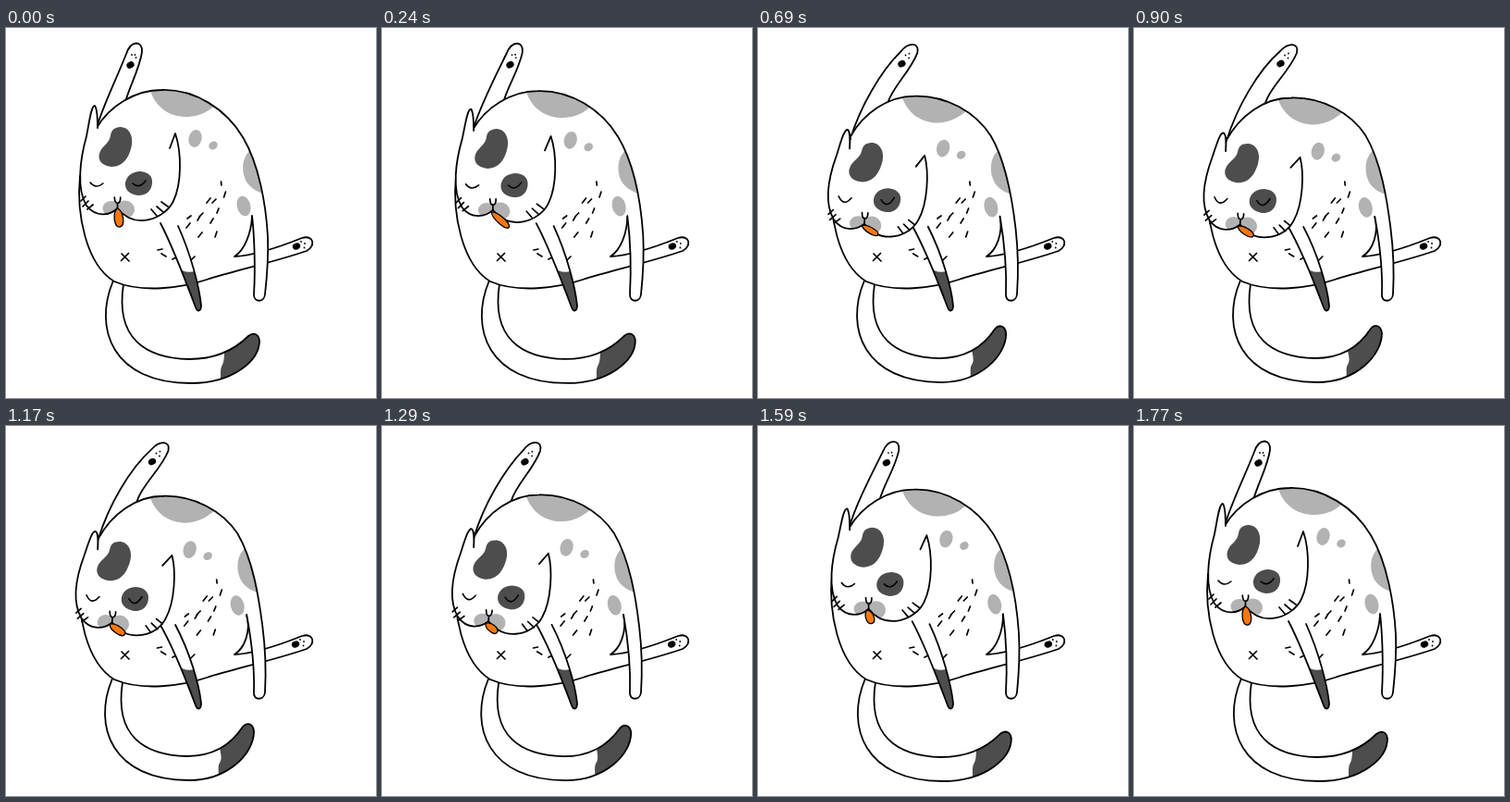
Write an HTML page with a canvas that moves like this. It is 400 px wide and 400 px high and loops after 1800 ms.

```html
<!DOCTYPE html>
<html lang="en">
<head>
<meta charset="utf-8">
<title>Cat washing itself</title>
<style>
html, body { margin: 0; width: 100%; height: 100%; overflow: hidden; background: #fff; }
canvas { display: block; width: 400px; height: 400px; }
</style>
</head>
<body>
<canvas id="stage" width="400" height="400"></canvas>
<script>
const ctx = document.getElementById('stage').getContext('2d');
const LOOP = 1800, DARK = '#4d4d4d', GRAY = '#b2b2b2', ORANGE = '#f9780c';

const soft = x => (1 - Math.cos(Math.PI * Math.min(1, Math.max(0, x)))) / 2;
// Eases up between a and b, holds, eases down between c and d.
const sway = (t, a, b, c, d) => soft((t - a) / (b - a)) - soft((t - c) / (d - c));
const lerp = (a, b, p) => a + (b - a) * p;

// Blends two path strings with the same commands.
function mix(from, to, p) {
  const ends = to.match(/-?[\d.]+/g);
  let i = 0;
  return new Path2D(from.replace(/-?[\d.]+/g, n => lerp(+n, +ends[i++], p).toFixed(3)));
}

function fill(path, color) {
  ctx.fillStyle = color;
  ctx.fill(path);
}

function line(path, width = 1.8) {
  ctx.lineWidth = width;
  ctx.stroke(path);
}

function shape(path, color = '#fff', width) {
  fill(path, color);
  line(path, width);
}

function oval(x, y, rx, ry, color, turn = 0) {
  ctx.beginPath();
  ctx.ellipse(x, y, rx, ry, turn, 0, 7);
  ctx.fillStyle = color;
  ctx.fill();
}

function clipped(path, draw) {
  ctx.save();
  ctx.clip(path);
  draw();
  ctx.restore();
}

function paw(x, y, dots, turn) {
  oval(x, y, 4.3, 3.5, '#000', turn);
  for (const [dx, dy] of dots) oval(x + dx, y + dy, 0.9, 0.9, '#000');
}

function tail(p) {
  const path = mix(
    'M116,273 C94,325 115,384 200,384 C245,384 274,360 274,338 C273,330 267,329 262,333 C248,347 228,358 198,358 C150,357 118,335 127,277',
    'M115,273 C93,325 115,383 198,383 C240,383 268,354 268,330 C267,321 260,320 256,325 C245,342 226,357 196,357 C149,356 117,335 126,277', p);
  fill(path, '#fff');
  clipped(path, () => fill(mix(
    'M237,345 C235,354 237,359 233,366 C231,371 233,376 231,386 L290,386 L290,320 L250,320 Z',
    'M231,342 C230,352 235,357 231,364 C228,369 231,374 229,386 L290,386 L290,310 L243,310 Z', p), DARK));
  line(path);
}

function raisedLeg(p) {
  shape(mix(
    'M98,108 C104,86 119,56 130,28 C135,13 148,13 147,26 C144,45 134,62 129,80',
    'M100,122 C111,86 134,46 158,25 C167,15 179,16 176,27 C168,47 147,64 142,81', p));
  paw(lerp(134.5, 158.5, p), lerp(40, 38.5, p),
    [[lerp(1.5, 4.5, p), lerp(-11, -9, p)], [lerp(5, 8.5, p), -11], [lerp(6, 8, p), lerp(-8, -6, p)]], -0.5);
}

const TUFTS = [
  [232.5, 166, 0.4, 4], [237.5, 177, -2, 6], [221, 184, -4, 5], [227, 185, -4, 4],
  [213, 200, -4, 4], [230, 195, -2, 5], [210, 203, -3, 5], [224, 206, -3, 5],
  [200, 203, -4, 3], [199, 211, -4, 5], [228, 220, -2, 6], [212, 221, -4, 5],
  [164, 240, 5, -1], [168, 244, 5, 3], [204, 247, -4, 4], [180, 250, 6, -3]
];

function body(p) {
  shape(new Path2D('M80,160 C76,200 86,255 117,274 C147,287 190,281 217,272 C245,263 290,253 325,241 C335,236 333,223 320,227 C300,235 270,246 247,247 C258,240 265,222 266,203'
    .replace('266,203', lerp(266, 260, p) + ',204')));
  const back = mix(
    'M98,108 C112,84 140,67 168,67 C205,66 238,88 256,118 C274,148 281,192 283,225 C284,250 282,270 280,288 C279,297 268,297 268,288 C270,255 268,220 266,203',
    'M100,122 C114,96 140,76 170,76 C203,75 234,92 250,116 C267,145 273,185 277,215 C281,245 281,270 280,288 C279,297 267,297 268,288 C269,255 263,220 260,204', p);
  fill(back, '#fff');
  clipped(back, () => {
    fill(mix(
      'M155,64 C160,86 178,97 197,96 C210,95 218,91 225,84 L225,55 Z',
      'M154,72 C160,95 176,105 195,105 C208,104 217,99 225,92 L225,62 Z', p), GRAY);
    fill(mix(
      'M268,130 C254,136 253,158 262,169 C267,175 274,178 284,181 L295,140 Z',
      'M262,130 C247,137 248,160 256,170 C261,176 268,179 278,182 L289,140 Z', p), GRAY);
  });
  line(back);

  oval(lerp(204.5, 198.5, p), lerp(119.5, 134, p), 7, 9.5, GRAY, 0.25);
  oval(lerp(224, 218, p), lerp(127, 141, p), 5, 4.2, GRAY, -0.6);
  oval(lerp(257, 250, p), lerp(192.5, 194, p), 7.3, 11, GRAY, -0.25);
  paw(lerp(314, 313, p), 236, [[5, -5], [9, -3], [8.5, 1.5]], -0.4);

  const marks = new Path2D('M125,244 L133,252 M132.5,243.5 L124.5,251.5');
  for (const [x, y, dx, dy] of TUFTS) {
    const sx = x - 5 * p * Math.max(0, 250 - y) / 85;
    marks.moveTo(sx, y);
    marks.lineTo(sx + dx, y + dy);
  }
  line(marks, 1.7);
}

function arm(p) {
  const path = mix(
    'M167,211 C178,232 193,270 205,302 C207,308 211,306 211,300 C209,280 200,245 186,214',
    'M165,212 C177,232 193,270 205,302 C207,308 211,306 211,300 C209,280 199,245 183,215', p);
  fill(path, '#fff');
  clipped(path, () => fill(new Path2D('M184,258 Q193,266 204,263 L220,310 L195,310 Z'), DARK));
  line(path);
}

// time, base x, base y, tip x, tip y, width
const LICKS = [
  [0, 120.5, 195, 123, 215, 6.3],
  [240, 119, 197, 138, 213.5, 5],
  [480, 118, 197, 134, 207, 3.6],
  [690, 118, 197, 136, 206, 4.3],
  [1170, 118, 197, 135, 207, 5.3],
  [1410, 117, 198, 126, 206, 5.3],
  [1770, 120.5, 195, 123, 215, 6.3],
  [1800, 120.5, 195, 123, 215, 6.3]
];

function tongue(t) {
  const i = LICKS.findIndex(k => k[0] > t), from = LICKS[i - 1], to = LICKS[i];
  const p = (t - from[0]) / (to[0] - from[0]);
  const [, x, y, tx, ty, w] = from.map((v, j) => lerp(v, to[j], p));
  const len = Math.hypot(tx - x, ty - y);
  ctx.save();
  ctx.translate(x, y);
  ctx.rotate(Math.atan2(ty - y, tx - x));
  shape(new Path2D(`M0,0 C${len * 0.2},${-w} ${len},${-w} ${len},0 C${len},${w} ${len * 0.2},${w} 0,0 Z`), ORANGE, 1.3);
  ctx.restore();
}

function head(p, ears, t) {
  ctx.save();
  ctx.translate(120 - 5.5 * p, 190 + 17.5 * p);
  ctx.rotate(0.063 * p);
  ctx.translate(-120, -190);

  const face = mix(
    'M177,130 L183,114 C190,135 190,168 181,187 C172,206 140,219 120.5,195 C113,202 98,206 87,192 C76,174 80,142 87,117 C90,102 92,84 96,84 C99,88 99,98 99,108',
    'M171,130 L180.6,118.5 C186,135 187,168 178,187 C170,206 140,217 120.5,195 C113,202 98,206 87,192 C75,174 79,147 86,124 C90,109 93,96 97,98 C100,101 100,108 100,117', ears);
  fill(face, '#fff');
  clipped(face, () => {
    oval(114, 195, 9.5, 8, GRAY);
    oval(129, 196, 10, 9.5, GRAY, 0.3);
  });
  fill(new Path2D('M119,108 C130,104 138,114 136,126 C134,138 128,150 114,150 C102,149 98,141 102,133 C106,126 112,124 113,116 C114,111 116,109 119,108 Z'), DARK);
  fill(new Path2D('M144,155 C153,155 159,160 158,168 C157,177 151,181 143,181 C134,180 128,175 129,167 C131,159 136,156 144,155 Z'), DARK);
  line(face);

  const dip = 174.5 + 4 * p;
  line(new Path2D(`M91,167 Q97,${dip} 105,168 M137,168 Q144,${dip} 151,165`), 1.6);
  tongue(t);
  line(new Path2D('M117.3,183 Q117.5,189 120.5,189.5 Q124,189 123.7,183 M120.5,189 V195'), 1.7);
  line(new Path2D('M81,187 L86,182 M83,193 L89,187 M88,196 L94,191 M157,196 L163,203 M163,193 L170,199 M168,188 L175,193'), 1.7);
  ctx.restore();
}

function frame(now) {
  const t = now % LOOP;
  ctx.fillStyle = '#fff';
  ctx.fillRect(0, 0, 400, 400);
  ctx.strokeStyle = '#000';
  ctx.lineCap = ctx.lineJoin = 'round';

  const trunk = sway(t, 0, 1060, 1100, 1780);
  tail(sway(t, 180, 760, 1140, 1640));
  raisedLeg(sway(t, 0, 900, 1110, 1780));
  body(trunk);
  arm(trunk);
  head(sway(t, 90, 790, 1190, 1730), sway(t, 0, 1020, 1170, 1770), t);
  requestAnimationFrame(() => frame(performance.now()));
}
frame(0);
</script>
</body>
</html>
```
